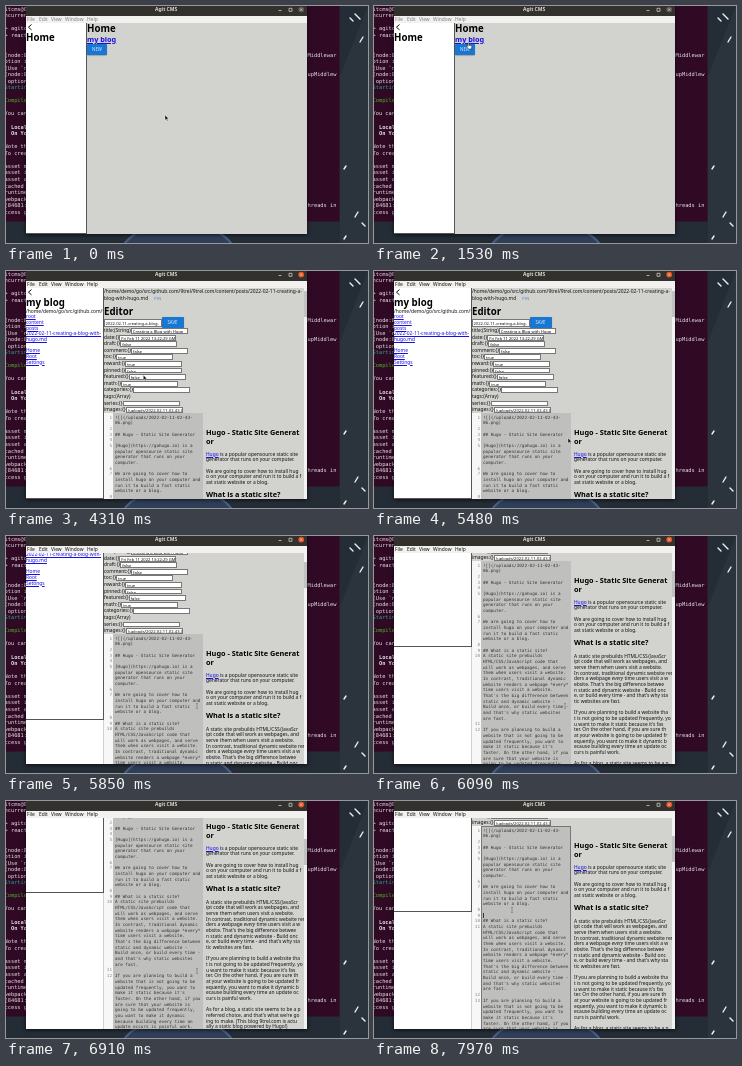
An HTML page for the animation above (8 s loop, 362 by 237 pixels).

```html
<!DOCTYPE html>
<html lang="en">
<head>
<meta charset="utf-8">
<title>Agit CMS</title>
<style>
html, body { margin: 0; width: 100%; height: 100%; overflow: hidden; background: #232a33; }
#stage { position: relative; width: 362px; height: 237px; overflow: hidden; font-family: "Noto Sans", sans-serif; color: #111; }
#stage > *, .page, .box, .t { position: absolute; }
svg { left: 0; top: 0; overflow: visible; }
.t { --lh: 5.67px; font-size: 4.9px; line-height: var(--lh); margin-top: calc(var(--lh) / -2); white-space: pre; }
.h1 { --lh: 10px; font-size: 9.7px; font-weight: bold; color: #000; }
.h2 { --lh: 9px; font-size: 7.3px; font-weight: bold; color: #000; }
.mono { font: 4.3px/var(--lh) "DejaVu Sans Mono", monospace; color: #333; }
.num { width: 8px; text-align: right; color: #888; }
.term { --lh: 6.55px; font: 5.35px/var(--lh) "DejaVu Sans Mono", monospace; color: #e4dfe3; }
.title { font-size: 5px; font-weight: bold; color: #dfdbd2; }
.pin { font-size: 4.3px; color: #5b8fd0; }
.gray { color: #777; }
.gray u { text-decoration-color: #888; }
a { color: #1a10e0; text-decoration: underline; }
.btn { background: #1976d2; border-radius: 1px; color: #d8ecff; font-size: 4.4px; text-align: center; box-shadow: 0 .5px 1px #0006; }
.in { display: inline-block; vertical-align: top; box-sizing: border-box; width: 57px; height: 5.8px; padding-left: 1px; overflow: hidden;
  font-size: 4.1px; line-height: 5px; background: #fff; border: .5px solid #777; }
.pane { background: #fff; border: solid #555; border-width: 0 1px 1px 0; box-sizing: border-box; }
.focus { outline: 1px solid #777; outline-offset: -1px; }
#view { inset: 0; clip-path: inset(17px 61px 9px 20px); background: #d2d2cf; }
.page { inset: 0; }
</style>
</head>
<body>
<div id="stage"></div>
<script>
const LOOP = 8000, LINE = 5.67;
const SITE = '/home/demo/go/src/github.com/9trel/9trel.com';
const POST = '2022-02-11-creating-a-blog-with-hugo.md';

const text = (x, y, html, cls = '') => `<div class="t ${cls}" style="left:${x}px;top:${y}px">${html}</div>`;
const box = (x, y, w, h, style = '', cls = '', html = '') =>
  `<div class="box ${cls}" style="left:${x}px;top:${y}px;width:${w}px;height:${h}px;${style}">${html}</div>`;
const back = `<svg class="box" width="1" height="1"><path d="M25.5 18.5L22.5 21.2l3 2.7" fill="none" stroke="#111"/></svg>`;
const link = s => `<a>${s}</a>`;

// Desktop and terminal
const desktop = `<svg width="362" height="237">
  <rect width="362" height="237" fill="#242c35"/>
  <path d="M362 0L334 70V237H362Z" fill="#2b343d"/>
  <ellipse cx="172" cy="251" rx="58" ry="34" fill="#2f3f58" stroke="#475f86" stroke-width="2"/>
  <path d="M344 12l3 3M349 8l5 5M357 31l-3 5M352 206l-3 5M340 160l-2 3M356 217l3 3M338 233l2-3" stroke="#eef2f4" stroke-width="1.4" stroke-linecap="round"/>
  <rect width="333.5" height="215.5" fill="#300a24"/></svg>`;
const green = (s, c) => `<span style="color:${c}">${s}</span>`;
const log = ['itcms@0', 'ncurren', '', '&gt; agitc', '&gt; react', '', '', '(node:8', 'ption i', '(Use `n', '(node:8', ' option',
  green('Startin', '#2aa198'), '', green('Compile', '#4fae2c'), '', 'You can', '', '<b>  Local</b>', '<b>  On Yo</b>', '',
  'Note th', 'To crea', '', 'asset m', 'asset i', 'asset a', 'cached ', 'runtime', 'webpack', '[84681:', 'ccess gp'];
const logEnd = [];
logEnd[7] = 'Middlewar'; logEnd[10] = 'upMiddlew'; logEnd[30] = 'hreads in';

// Window frame
const chrome = box(20, 0, 281, 228, 'background:#d2d2cf;box-shadow:0 1px 4px #000a') +
  box(20, 0, 281, 9.5, 'background:#33312d') + box(20, 9.5, 281, 7.5, 'background:#f2f1f0') +
  text(149, 3.6, 'Agit CMS', 'title') +
  `<div id="menu">${[['File', 21], ['Edit', 33], ['View', 45], ['Window', 59], ['Help', 81]].map(([s, x]) => text(x, 13.6, s)).join('')}</div>` +
  `<svg width="362" height="10"><circle id="close" cx="295.2" cy="3.6" r="2.9"/>
   <path d="M272.5 4.5h3M283 2.3h3v3h-3zM294 2.4l2.4 2.4m0-2.4L294 4.8" fill="none" stroke="#dfdbd2" stroke-width=".7"/></svg>`;

// Pages
const home = box(20, 17, 61, 211, '', 'pane') + back + text(20, 32, 'Home', 'h1') + text(81, 23, 'Home', 'h1') +
  text(81, 33, link('my blog'), 'h2') + box(81, 38, 20, 10.5, 'line-height:10.5px', 'btn', 'NEW');

const sidebar = box(20, 17, 78, 211, '', 'pane') + back + text(20, 32, 'my blog', 'h1') +
  `<div class="box" style="inset:0;clip-path:inset(0 265px 0 0)">${text(20, 40.5, SITE)}</div>` +
  text(20, 46, ['root', 'content', 'posts', '2022-02-11-creating-a-blog-with-', 'hugo.md', '', 'Home', 'Root', 'Settings']
    .map(s => s && link(s)).join('\n'));

const blog = sidebar + text(98, 22, SITE) + text(214.5, 22, 'PIN', 'pin') +
  text(98, 31.3, ['.forestry', '.frontmatter', '.git', '.vscode', 'README.md', 'archetypes', 'assets', 'config', 'content', 'data',
    'layouts', 'resources', 'src', 'static', 'themes'].map(s => s === 'README.md' ? `<b>${link(s)}</b>` : `<u>${s}</u>`).join('\n'), 'gray');

const fields = [['title:(String)', 'Creating a Blog with Hugo'], ['date:{}', 'Fri Feb 11 2022 13:22:29 GMT+0900'], ['draft:{}', 'false'],
  ['comment:{}', 'false'], ['toc:{}', 'true'], ['reward:{}', 'true'], ['pinned:{}', 'false'], ['featured:{}', 'false'], ['math:{}', 'true'],
  ['categories:{}', ''], ['tags:(Array)'], ['series:{}', ''], ['images:{}', '/uploads/2022-02-11-02-43-06.png']];
const input = v => v === undefined ? '' : `<span class="in">${v}</span>`;

const source = ['![](/uploads/2022-02-11-02-43-\n06.png)', '', '## Hugo - Static Site Generator', '',
  '[Hugo](https://gohugo.io) is a popular opensource static site generator that runs on your computer.', '',
  'We are going to cover how to install hugo on your computer and run it to build a fast static website or a blog.', '',
  '## What is a static site?',
  `A static site prebuilds\nHTML/CSS/JavaScript code that will work as webpages, and serve them when users visit a website. In contrast, traditional dynamic website renders a webpage *every* time users visit a website. That's the big difference between static and dynamic website - Build once, or build every time - and that's why static websites are fast.`, '',
  `If you are planning to build a website that is not going to be updated frequently, you want to make it static because it's faster. On the other hand, if you are sure that your website is going to be updated frequently, you want to make it dynamic because building every time an update occurs is painful work.`, '',
  `As for a blog, a static site seems to be a preferred choice, and that's what we're going to make. (This blog 9trel.com is actually a static blog powered by Hugo!)`];
const wrap = s => s.replace(/(.{1,33})(\s|$)/g, '$1\n').trimEnd();
const editor = lines => text(109, 146.5, lines.map(wrap).join('\n'), 'mono') +
  text(98, 146.5, lines.map((s, i) => i + 1 + wrap(s).replace(/[^\n]/g, '')).join('\n'), 'mono num');

const article = `A static site prebuilds HTML/CSS/JavaScr
ipt code that will work as webpages, and
serve them when users visit a website.
In contrast, traditional dynamic website ren
ders a webpage <i>every</i> time users visit a w
ebsite. That's the big difference betwee
n static and dynamic website - Build onc
e, or build every time - and that's why sta
tic websites are fast.

If you are planning to build a website tha
t is not going to be updated frequently, yo
u want to make it static because it's fas
ter. On the other hand, if you are sure th
at your website is going to be updated fr
equently, you want to make it dynamic b
ecause building every time an update oc
curs is painful work.

As for a blog, a static site seems to be a p
referred choice, and that's what we're go
ing to make. (This blog 9trel.com is actu
ally a static blog powered by Hugo!)

In this article, I assume you have basic kn
owledge of git and github.`;

const post = box(20, 17, 77, 600, 'background:#fff') + sidebar +
  text(98, 20.5, SITE + '/content/posts/2022-02-11-creating-a-') + text(98, 28, 'blog-with-hugo.md') +
  text(148, 28, 'PIN', 'pin') + text(98, 40.5, 'Editor', 'h1') +
  box(97.5, 47.5, 58, 8, 'height:8px;line-height:7px', 'in', POST) + box(155.5, 46, 22, 10.5, 'line-height:10.5px', 'btn', 'SAVE') +
  fields.map(([k, v], i) => text(98, 60 + 6.58 * i, k + input(v))).join('') +
  box(98, 142, 9, 400, 'background:#f7f7f7') + box(107, 142, 90, 400, 'background:#bfbfbd', 'code') + '<div id="editor"></div>' +
  box(109, 229.5, .5, 5.5, 'background:#333', 'caret') +
  text(200, 161.5, 'Hugo - Static Site Generat\nor', 'h2') +
  text(200, 183.5, link('Hugo') + ' is a popular opensource static site\ngenerator that runs on your computer.') +
  text(200, 200.5, 'We are going to cover how to install hug\no on your computer and run it to build a f\nast static website or a blog.') +
  text(200, 223.5, 'What is a static site?', 'h2') + text(200, 237.5, article) + text(200, 391, 'Installing', 'h2');
const scrollbar = box(297.5, 17, 3.5, 211, 'background:#f1f1f1') + box(298, 20, 2.5, 26, 'background:#c1c1c1', 'thumb');

const stage = document.getElementById('stage');
stage.innerHTML = desktop + text(-1.5, 3, log.join('\n'), 'term') + text(301.5, 3, Array.from(logEnd, s => s || '').join('\n'), 'term') +
  chrome + `<div id="view"><div class="page" id="home">${home}</div><div class="page" id="blog">${blog}</div>
  <div class="page" id="post">${post}</div><div id="scrollbar">${scrollbar}</div></div>` +
  `<svg width="10" height="10" id="cursor">
    <path id="arrow" d="M0 0V5.2L1.3 4.1 2.2 6 3 5.6 2.2 3.8H3.7Z" fill="#111" stroke="#fff" stroke-width=".4"/>
    <path id="hand" d="M0 0q.7-.4 1 .2V2.3L3.3 2.8Q4 3 3.8 4L3.3 6H.4L-1.3 3.5Q-1-.0 0 3.6Z" fill="#fff" stroke="#222" stroke-width=".5"/>
    <path id="beam" d="M-.8-2.5H.8M0-2.5V2.5M-.8 2.5H.8" fill="none" stroke="#444" stroke-width=".4"/></svg>`;

const $ = id => document.getElementById(id);
const show = (el, on) => { el.style.display = on ? '' : 'none'; };
const [caret, code, thumb] = ['.caret', '.code', '.thumb'].map(s => document.querySelector(s));

// Segments: [start, end, ...values]; motion advances in 60 ms steps.
const STEP = 60;
const follow = (start, segments, t) => {
  let now = start;
  for (const [from, to, ...goal] of segments) {
    if (t < from) break;
    const p = t >= to ? 1 : Math.floor((t - from) / STEP) * STEP / (to - from);
    const e = p * p * (3 - 2 * p);
    now = now.map((v, i) => v + (goal[i] - v) * e);
  }
  return now;
};
const pointer = [[930, 1530, 94, 37], [2100, 2820, 53, 63], [3400, 4680, 160, 115], [4820, 5480, 194, 167],
  [5540, 5660, 191, 170], [6910, 7450, 138, 109]];
const scrolling = [[5660, 6090, 117], [6290, 6530, 166], [6670, 7090, 117]];
let typed;

function draw() {
  const t = performance.now() % LOOP;
  const page = t < 1830 ? 'home' : t < 3400 ? 'blog' : 'post';
  ['home', 'blog', 'post'].forEach(id => show($(id), id === page));
  show($('scrollbar'), page === 'post');
  const focused = t >= 1830;
  $('menu').style.opacity = focused ? 1 : .5;
  $('close').setAttribute('fill', focused ? '#e95420' : '#5b5852');

  const scroll = Math.round(follow([0], scrolling, t)[0]);
  $('post').style.transform = `translateY(${-scroll}px)`;
  thumb.style.top = 20 + scroll * .132 + 'px';

  const newline = t >= 7850, editing = t >= 7450;
  if (newline !== typed) {
    typed = newline;
    $('editor').innerHTML = editor(newline ? [...source.slice(0, 8), '', ...source.slice(8)] : source);
  }
  show(caret, editing);
  caret.style.top = 223 + (newline ? LINE : 0) + 'px';
  code.classList.toggle('focus', editing);

  const [x, y] = follow([159, 109], pointer, t);
  $('cursor').style.transform = `translate(${x}px,${y}px)`;
  const shape = t >= 5660 ? 'beam' : (t >= 1470 && t < 1830) || (t >= 2760 && t < 3460) ? 'hand' : 'arrow';
  ['arrow', 'hand', 'beam'].forEach(id => show($(id), id === shape));
  requestAnimationFrame(draw);
}
draw();
</script>
</body>
</html>
```
